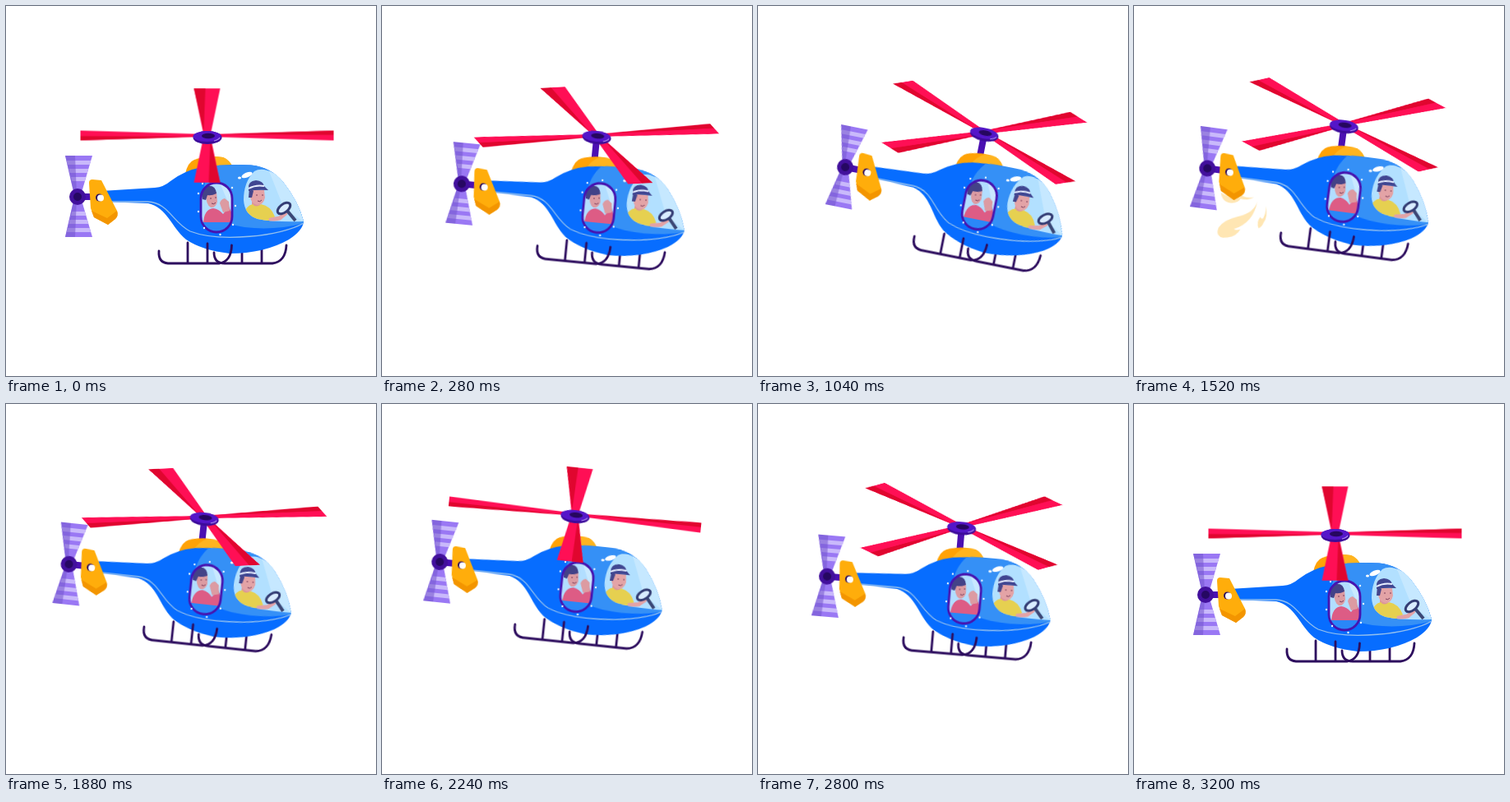
Recreate the animation shown at these times as an HTML page without scripts. Size 450x450 px, loop 3240 ms.

```html
<!DOCTYPE html>
<html lang="en">
<head>
<meta charset="utf-8">
<title>Helicopter</title>
<style>
html, body { margin: 0; width: 100%; height: 100%; overflow: hidden; background: #fff; }
svg { display: block; width: 100vw; height: 100vh; }
.drift, .lift, .tilt, .spin { animation: 3240ms linear -8ms infinite; transform-origin: 0 0; }
.drift { animation-name: drift; }
.lift { animation-name: lift; }
.tilt { animation-name: tilt; }
.spin { animation-name: spin; }
.smoke { animation: puff 1080ms linear -8ms infinite; transform-origin: 134px 212px; }

@keyframes drift {
  0% { transform: translateX(245px); animation-timing-function: cubic-bezier(.333, 0, .667, 1); }
  19.75% { transform: translateX(283px); animation-timing-function: cubic-bezier(.333, 0, .667, 1); }
  69.75% { transform: translateX(235px); animation-timing-function: cubic-bezier(.333, 0, .667, 1); }
  88.3% { transform: translateX(248px); animation-timing-function: cubic-bezier(.333, 0, .667, 1); }
  98.77%, 100% { transform: translateX(245px); }
}
@keyframes lift {
  0%, 19.75% { transform: translateY(159px); animation-timing-function: cubic-bezier(.333, 0, .667, 1); }
  69.75% { transform: translateY(136px); animation-timing-function: cubic-bezier(.333, 0, .667, 1); }
  98.77%, 100% { transform: translateY(159px); }
}
@keyframes tilt {
  0% { transform: rotate(0deg); animation-timing-function: cubic-bezier(.333, 0, .667, 1); }
  19.75% { transform: rotate(13deg); animation-timing-function: cubic-bezier(.333, 0, .667, 1); }
  58.6% { transform: rotate(6.1deg); }
  69.1% { transform: rotate(6deg); animation-timing-function: ease-in; }
  86.4% { transform: rotate(5deg); animation-timing-function: cubic-bezier(.3, .3, .6, 1); }
  98.77%, 100% { transform: rotate(0deg); }
}
/* 80 steps of 22.5 degrees, then one held step */
@keyframes spin {
  0% { transform: rotate(0deg); animation-timing-function: steps(80, end); }
  98.7654%, 100% { transform: rotate(1800deg); }
}
@keyframes puff {
  0%, 27% { transform: translate(2px, -18px) scale(.3); opacity: 0; }
  33% { transform: translate(1.5px, -11px) scale(.6); opacity: 1; }
  40.7% { transform: translate(1px, -6px) scale(.87); opacity: 1; }
  55.6% { transform: translate(0, 0) scale(1); opacity: 1; }
  58.5%, 100% { transform: translate(-1px, 3px) scale(1.04); opacity: 0; }
}
</style>
</head>
<body>
<svg viewBox="0 0 450 450">
  <defs>
    <g id="blade">
      <path fill="#ff0f55" d="M0-4L154-16V16L0 4Z"/>
      <path fill="#e0062f" d="M14-4L154-16V-2Z"/>
    </g>
    <g id="fan">
      <path fill="#9a78f4" d="M72 182H105L91 230H83Z"/>
      <path fill="#c9b9fb" d="M73.5 188H103.2L101.7 193H75ZM76.3 198H100.2L98.7 203H77.5ZM79 208H97.2L95.7 213H80.3Z"/>
      <path fill="#7355cc" fill-opacity=".55" d="M72 182H84L86 230H83Z"/>
    </g>
    <path id="hull" d="M116 225L181 221Q192 220 200 213Q217 200 238 196Q268 192 298 193.5Q322 196 337 214Q356 238 362 262Q361 273 344 284Q314 301 272 301Q238 297 219 284C201 269 196 245 173 240L116 238Z"/>
    <path id="glass" d="M302 201Q289 214 289 236Q290 254 306 259Q325 263 362 262Q356 238 337 214Q327 201 314 199Q307 198 302 201Z"/>
    <rect id="port" x="237" y="215" width="38" height="60" rx="19"/>
    <clipPath id="inHull"><use href="#hull"/></clipPath>
    <clipPath id="inGlass"><use href="#glass"/></clipPath>
    <clipPath id="inPort"><use href="#port"/></clipPath>
  </defs>

  <g class="drift"><g class="lift"><g class="tilt"><g transform="translate(-245 -159)">

    <g transform="translate(87 232) rotate(-12.9) translate(-109 -194)">
      <g class="smoke" fill="#ffe6b3">
        <path d="M169 250Q163 265 142 268Q120 271 112 281Q105 296 123 296Q137 295 142 286Q137 288 133 285Q161 279 169 250Z"/>
        <path d="M120 233Q120 247 134 249Q143 249 146 244Q155 248 165 244Q152 244 146 238Q139 234 134 238Q126 239 120 233Z"/>
        <path d="M180 257Q182 273 175 280Q172 286 167 287Q165 278 171 272Q174 277 176 272Q180 266 180 257Z"/>
      </g>
    </g>

    <!-- far skid -->
    <path fill="none" stroke="#2d0d5e" stroke-width="2.8" stroke-linecap="round" d="M253 300Q253 313 266 313H324Q340 311 341 291M287 295V313M311 290V313"/>

    <!-- mast and cap -->
    <path fill="#4b10b2" d="M241 163H249V187H241Z"/>
    <path fill="#ffa206" d="M218 204Q221 190 229 187Q246 181 264 184Q272 187 277 198Z"/>
    <path fill="#ffb41f" d="M234 202Q240 188 252 183L264 184Q272 187 277 198Z"/>

    <!-- hull -->
    <use href="#hull" fill="#076dff"/>
    <g clip-path="url(#inHull)">
      <path fill="#3590f6" d="M258 190Q239 208 240 232Q244 262 290 269Q330 274 370 262V185Z"/>
      <path fill="none" stroke="#93c0ee" stroke-width="1.3" d="M116 238H172C198 239 202 263 224 274C260 288 335 280 362 264"/>
    </g>

    <!-- pilot -->
    <use href="#glass" fill="#b2e0ff"/>
    <g clip-path="url(#inGlass)">
      <path fill="#c6e8ff" d="M318 196L338 246L362 262L345 210Z"/>
      <path fill="#dc9698" d="M299 236H309V246H299Z"/>
      <path fill="#e6d050" d="M288 264Q288 244 300 241Q304 246 310 241Q322 243 327 256L320 264Z"/>
      <path fill="none" stroke="#e3a3a6" stroke-width="5" stroke-linecap="round" d="M322 260L333 258L340 252"/>
      <path fill="#e3a3a6" d="M297 224H314L315 233Q313 242 306 242Q299 241 297 233Z"/>
      <path fill="#44458c" d="M295 233L296 221L301 225L299 233Z"/>
      <path fill="#404692" d="M295 222Q294 213 304 212Q313 213 314 219L319 224Q306 223 295 225Z"/>
      <path fill="none" stroke="#e8eeff" stroke-width="2" d="M295 222Q304 217 314 219"/>
      <path fill="none" stroke="#713354" stroke-width=".9" d="M304 230H306M311 230H313M306 237Q309 239 311 236"/>
    </g>
    <path stroke="#3b4775" stroke-width="4" d="M342 249L352 261"/>
    <ellipse cx="338" cy="246" rx="9" ry="5" transform="rotate(-38 338 246)" fill="#d9ecff" stroke="#343d74" stroke-width="3"/>
    <g fill="#fff">
      <ellipse cx="293" cy="205.5" rx="7" ry="3" transform="rotate(-22 293 205.5)"/>
      <ellipse cx="284" cy="209" rx="2" ry="1.5"/>
    </g>

    <!-- passenger -->
    <use href="#port" fill="#b2deff"/>
    <g clip-path="url(#inPort)">
      <path fill="#c9e9ff" d="M259 213L276 252V213Z"/>
      <path fill="#dd5c85" d="M240 264Q241 247 252 246Q259 247 264 253L271 244L277 257L275 265Z"/>
      <path fill="#dc9ba2" d="M264 251L260 240Q261 235 266 234L271 238L272 249Z"/>
      <path fill="#dc9ba2" d="M243 228L256 226L257 238Q255 246 249 245Q243 242 243 228Z"/>
      <path fill="#434288" d="M239 235Q236 223 244 219Q255 217 256 228Q250 231 245 230L243 236Z"/>
      <path fill="none" stroke="#713354" stroke-width=".9" d="M248 234H250M254 233H256M250 240Q253 242 255 239"/>
      <path fill="#2a87f8" d="M237 263H275V276H237Z"/>
    </g>
    <use href="#port" fill="none" stroke="#4614b0" stroke-width="2.8"/>
    <path fill="none" stroke="#e4f2ff" stroke-width="2.4" stroke-linecap="round" d="M239 216h0M234 228h0M234 250h0M241 270h0M260.5 278h0M276 266h0M279 243h0M275 221h0M257 211h0"/>

    <!-- near skid -->
    <path fill="none" stroke="#2d0d5e" stroke-width="2.8" stroke-linecap="round" d="M186 298Q185 312 197 313H259Q274 311 274.5 291M221 288V313M245 289V313"/>

    <!-- tail -->
    <path stroke="#4b10b2" stroke-width="8" d="M90 232H107"/>
    <use href="#fan"/>
    <use href="#fan" transform="matrix(1 0 0 -1 0 463)"/>
    <circle cx="87" cy="232" r="10" fill="#42109c"/>
    <circle cx="87" cy="232" r="5" fill="#260862"/>
    <path fill="#ffad0b" d="M101 215Q101 211 105 211L116 212L135 249Q137 255 133 259L124 266L107 257L103 246Z"/>
    <path fill="#f39500" d="M135 249Q137 255 133 259L124 266L107 257L104 249L123 258Z"/>
    <circle cx="113.5" cy="233" r="4.500" fill="#2d0d5e"/>
    <circle cx="115" cy="233.5" r="4" fill="#fff"/>

    <!-- main rotor -->
    <g transform="translate(244.5 157.5) scale(1 .373)">
      <g class="spin">
        <use href="#blade"/>
        <use href="#blade" transform="rotate(90)"/>
        <use href="#blade" transform="rotate(180)"/>
        <use href="#blade" transform="rotate(270)"/>
      </g>
    </g>
    <ellipse cx="245" cy="160" rx="17.5" ry="8" fill="#3c0b9a"/>
    <ellipse cx="244.5" cy="158.5" rx="17" ry="6.5" fill="#5416c9"/>
    <ellipse cx="246" cy="158" rx="8" ry="3.3" fill="#26075f"/>
    <path fill="none" stroke="#a98af0" stroke-width="1.2" d="M253 164Q259 162.5 260 160"/>
  </g></g></g></g>
</svg>
</body>
</html>
```
